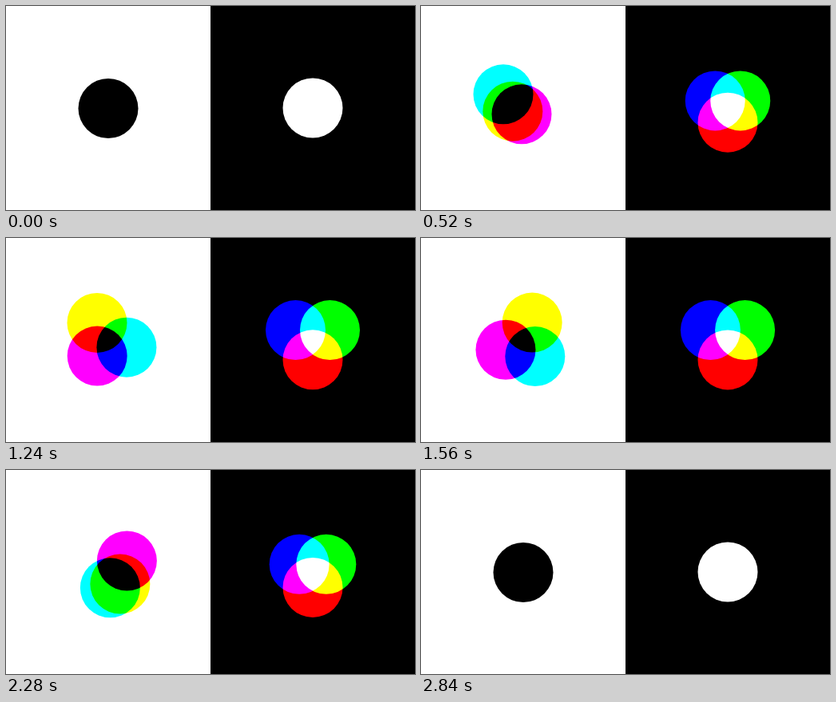
Recreate the animation shown at these times as an HTML page with a canvas. Size 512x256 px, loop 2880 ms.

```html
<!DOCTYPE html>
<html lang="en">
<head>
<meta charset="utf-8">
<title>Colour mixing</title>
<style>
  html, body { margin: 0; width: 100%; height: 100%; overflow: hidden; background: #fff; }
  canvas { display: block; width: 100%; height: 100%; }
</style>
</head>
<body>
<canvas id="stage" width="512" height="256"></canvas>
<script>
const ctx = document.getElementById('stage').getContext('2d');
const FRAME_MS = 40, FRAMES = 72, MID = 36, LAST = 71;
const DISC = 37.5, ORBIT = 25, TURN = 2 * Math.PI;

// Bezier easing from (0,0) to (1,1) with flat ends; a and b are the handles' x.
const ease = (a, b) => x => {
  if (x <= 0) return 0;
  if (x >= 1) return 1;
  let lo = 0, hi = 1;
  for (let i = 0; i < 30; i++) {
    const u = (lo + hi) / 2, v = 1 - u;
    if (3 * u * v * v * a + 3 * u * u * v * b + u * u * u < x) lo = u;
    else hi = u;
  }
  return lo * lo * (3 - 2 * lo);
};

const smooth = ease(1 / 3, 2 / 3);
const early = ease(1 / 3, 0);
const late = ease(1, 2 / 3);

function disc(x, y, color) {
  ctx.fillStyle = color;
  ctx.beginPath();
  ctx.arc(x, y, DISC, 0, TURN);
  ctx.fill();
}

// Angles run clockwise from straight down.
function orbitDisc(cx, cy, radius, angle, color) {
  disc(cx - radius * Math.sin(angle), cy + radius * Math.cos(angle), color);
}

function half(x, color) {
  ctx.globalCompositeOperation = 'source-over';
  ctx.fillStyle = color;
  ctx.fillRect(x, 0, 256, 256);
}

function drawSubtractive(frame, closing) {
  half(0, '#fff');
  ctx.globalCompositeOperation = 'multiply';
  const lift = frame < MID ? 1 - smooth(frame / MID) : closing;
  const cy = 128.5 - ORBIT * lift;
  const progress = frame / LAST;
  orbitDisc(128, cy, ORBIT, TURN * smooth(progress), '#ff0');
  orbitDisc(128, cy, ORBIT, TURN * late(progress), '#f0f');
  orbitDisc(128, cy, ORBIT, TURN * early(progress), '#0ff');
}

function drawAdditive(frame, closing) {
  half(256, '#000');
  ctx.globalCompositeOperation = 'lighter';
  const spread = ORBIT * (frame < MID ? early(frame / MID) : 1 - closing);
  ['#f00', '#00f', '#0f0'].forEach((color, i) =>
    orbitDisc(384, 128, spread, TURN * i / 3, color));
}

function draw(ms) {
  const frame = Math.floor(ms / FRAME_MS) % FRAMES;
  const closing = late((frame - MID) / (LAST - MID));
  drawSubtractive(frame, closing);
  drawAdditive(frame, closing);
}

const start = performance.now();
function tick() {
  draw(performance.now() - start);
  requestAnimationFrame(tick);
}
tick();
</script>
</body>
</html>
```
